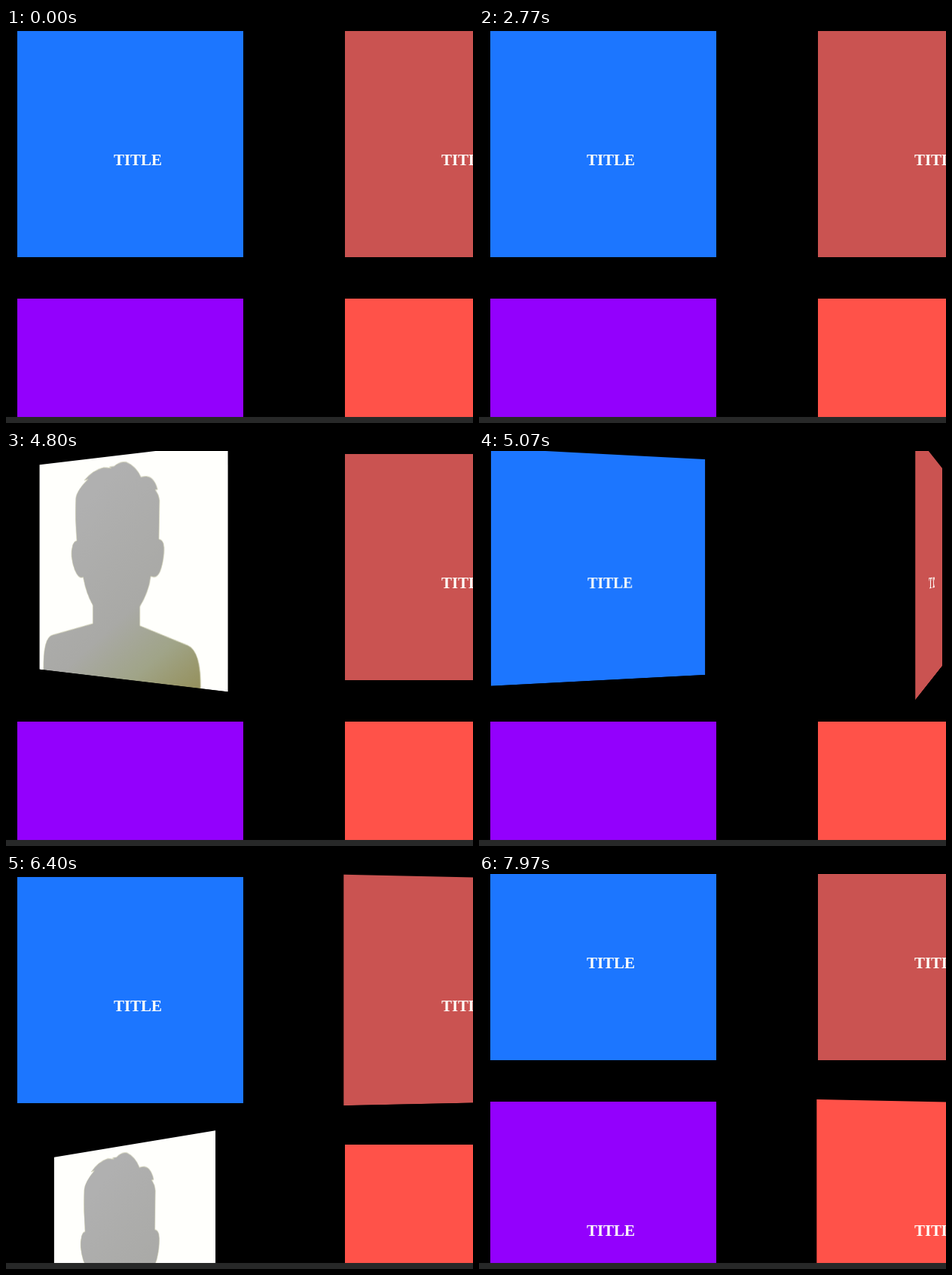
These frames come from a looping animation (620x524 px, 8 s). An HTML page:

```html
<!DOCTYPE html>
<html lang="en">
<head>
<meta charset="utf-8">
<title>Flip cards</title>
<style>
  html, body { margin: 0; width: 100%; height: 100%; overflow: hidden; background: #000; }
  #stage { position: relative; width: 620px; height: 524px; overflow: hidden; }
  #page { position: absolute; inset: 0; }
  #bar { position: absolute; left: 0; top: 516px; width: 620px; height: 8px; background: #272828; }
  .card { position: absolute; width: 300px; height: 300px; perspective: 1000px; }
  .inner { width: 100%; height: 100%; transform-style: preserve-3d; }
  .face { position: absolute; left: 0; top: 0; height: 300px; backface-visibility: hidden; }
  .front { width: 300px; }
  .back { width: 320px; background: #fffffc; transform: rotateY(180deg); }
  .back svg { display: block; }
  .title {
    position: absolute; left: 10px; top: 159px; width: 300px; text-align: center;
    font: bold 21px/24px "Liberation Serif", serif; color: #fffffa;
  }
</style>
</head>
<body>
<div id="stage">
  <div id="page"></div>
  <div id="bar"></div>
</div>
<script>
const LOOP = 8000, FLIP = 600;

// turns: [start time, 1 = show back, 0 = show front]
const cards = [
  { x: 15,  y: 4,   color: '#1c76ff', turns: [[3665, 1], [4703, 0]] },
  { x: 450, y: 4,   color: '#ca5351', turns: [[4906, 1], [5958, 0]] },
  { x: 15,  y: 359, color: '#9300fd', turns: [[6138, 1], [7066, 0]] },
  { x: 450, y: 359, color: '#ff5249', turns: [[7149, 1], [7558, 0]] },
];

const portrait = id => `
  <svg width="320" height="300">
    <linearGradient id="${id}" gradientUnits="userSpaceOnUse" x1="90" y1="60" x2="270" y2="300">
      <stop offset="0" stop-color="#b0b0b0"/>
      <stop offset=".55" stop-color="#a9a9a6"/>
      <stop offset=".8" stop-color="#a0a488"/>
      <stop offset="1" stop-color="#969260"/>
    </linearGradient>
    <path fill="url(#${id})" stroke="#d2d2b4" stroke-width=".8" d="M8 301 Q7 252 27 248 L104 228
      V203 Q91 186 86 164 Q78 168 70 154 Q60 134 66 119 Q69 113 74 113 Q70 83 72 53
      Q74 42 95 28 L88 29 Q104 16 124 14 L137 16 L134 14 L142 14 Q152 8 163 10
      Q180 17 188 32 Q208 28 215 50 L211 50 Q217 56 218 64 L217 114 Q227 115 225 133
      Q221 163 209 163 L204 162 Q201 182 186 202 V227 L262 248 Q282 254 281 301Z"/>
  </svg>`;

const page = document.getElementById('page');
cards.forEach((card, i) => {
  const el = document.createElement('div');
  el.className = 'card';
  el.style.cssText = `left:${card.x}px;top:${card.y}px`;
  el.innerHTML = `<div class="inner">
    <div class="face front" style="background:${card.color}"><div class="title">TITLE</div></div>
    <div class="face back">${portrait('shade' + i)}</div>
  </div>`;
  page.append(el);
  card.inner = el.firstChild;
});

const clamp = v => Math.min(1, Math.max(0, v));
const bezier = (a, b, s) => 3 * a * s * (1 - s) ** 2 + 3 * b * s * s * (1 - s) + s ** 3;

// cubic-bezier(.25, .1, .25, 1)
function ease(x) {
  if (x <= 0 || x >= 1) return clamp(x);
  let lo = 0, hi = 1;
  for (let i = 0; i < 24; i++) {
    const mid = (lo + hi) / 2;
    if (bezier(.25, .25, mid) < x) lo = mid; else hi = mid;
  }
  return bezier(.1, 1, lo);
}

// An interrupted turn reverses in proportionally less time.
function flipAt(turns, t) {
  let v = 0;
  turns.forEach(([start, to], i) => {
    if (t <= start) return;
    const end = Math.min(t, turns[i + 1]?.[0] ?? LOOP);
    v += (to - v) * ease((end - start) / (FLIP * Math.abs(to - v)));
  });
  return v;
}

function scrollAt(t) {
  const k = clamp((t - 7889) / 150);
  return Math.round(100 * k * k * (3 - 2 * k));
}

function draw(now) {
  const t = now % LOOP;
  for (const { inner, turns } of cards) {
    inner.style.transform = `rotateY(${180 * flipAt(turns, t)}deg)`;
  }
  page.style.top = -scrollAt(t) + 'px';
  requestAnimationFrame(draw);
}
draw(0);
</script>
</body>
</html>
```
